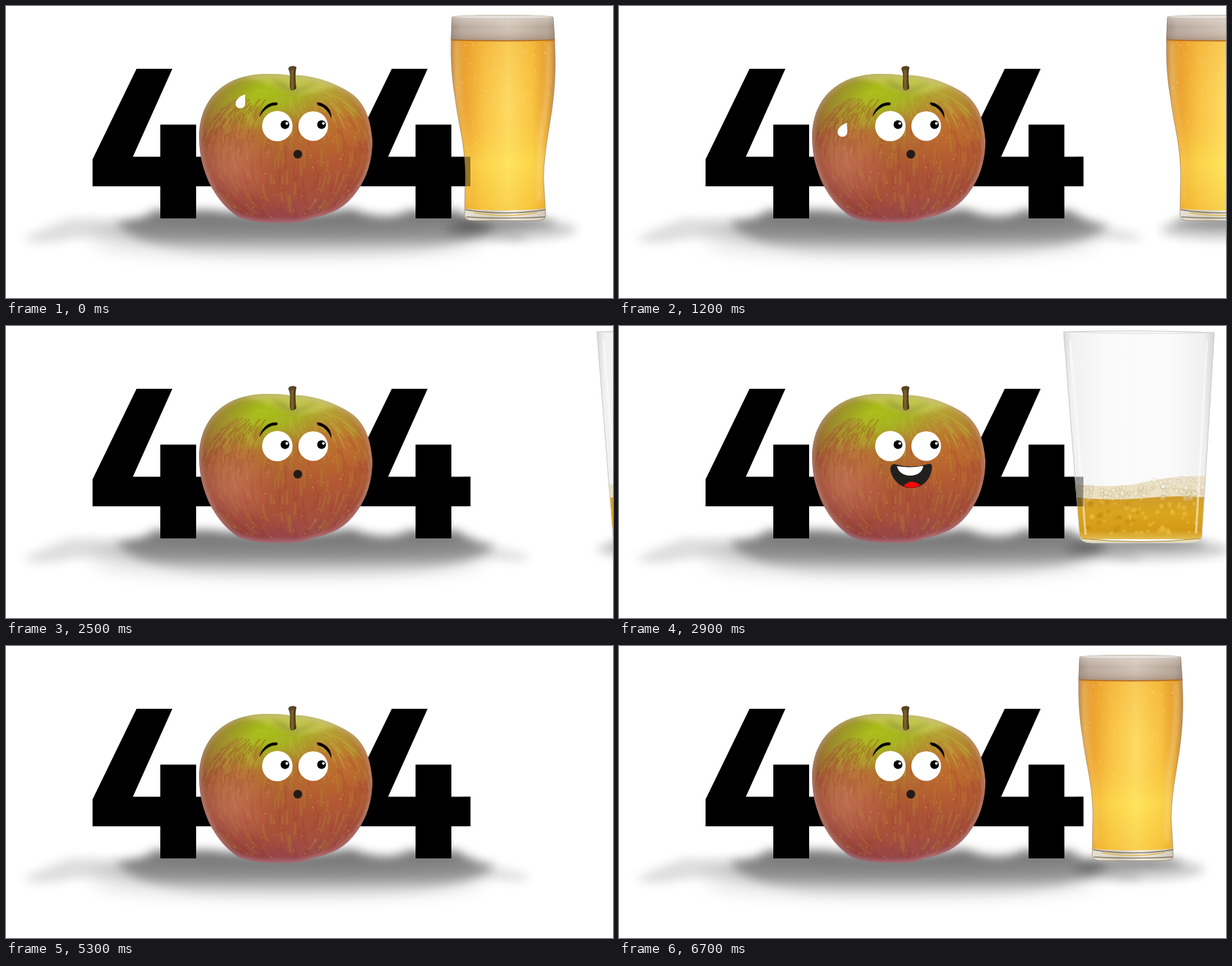
Write an HTML page that moves like this. It is 830 by 400 pixels and loops after 6800 ms.

```html
<!DOCTYPE html>
<html lang="en">
<head>
<meta charset="utf-8">
<title>404</title>
<style>
  html, body { margin: 0; width: 100%; height: 100%; overflow: hidden; background: #fff; }
  svg { display: block; width: 830px; height: 400px; }
  .anim { animation: 6800ms step-end infinite; }
  #beer { animation-name: beer; }
  #cider { animation-name: cider; }
  #drop { animation-name: drop; }
  #happy { animation-name: happy; }
  #worried { animation-name: worried; }
  @keyframes beer {
    0% { transform: translateX(0); }
    14.70% { transform: translateX(20px); }
    16.17% { transform: translateX(80px); }
    17.64% { transform: translateX(140px); }
    19.11% { transform: translateX(200px); }
    20.58% { transform: translateX(290px); }
    94.11% { transform: translateX(200px); }
    95.58% { transform: translateX(140px); }
    97.05% { transform: translateX(80px); }
    98.52%, 100% { transform: translateX(20px); }
  }
  @keyframes cider {
    0% { transform: translateX(290px); }
    36.76% { transform: translateX(200px); }
    38.23% { transform: translateX(140px); }
    39.70% { transform: translateX(80px); }
    41.17% { transform: translateX(20px); }
    42.64% { transform: translateX(0); }
    72.05% { transform: translateX(20px); }
    73.52% { transform: translateX(80px); }
    74.99% { transform: translateX(140px); }
    76.47% { transform: translateX(200px); }
    77.94%, 100% { transform: translateX(290px); }
  }
  @keyframes drop {
    0% { transform: translate(0, 0); opacity: 1; }
    14.70% { transform: translate(-5px, 12px); }
    16.17% { transform: translate(-10px, 25px); }
    17.64% { transform: translate(-15px, 39px); }
    19.11% { transform: translate(-19px, 54px); }
    20.58% { transform: translate(-22px, 70px); opacity: 1; }
    22.05%, 100% { opacity: 0; }
  }
  @keyframes happy {
    0% { opacity: 0; }
    39.70% { opacity: 1; }
    74.99%, 100% { opacity: 0; }
  }
  @keyframes worried {
    0% { opacity: 1; }
    39.70% { opacity: 0; }
    74.99%, 100% { opacity: 1; }
  }
</style>
</head>
<body>
<svg viewBox="0 0 830 400" xmlns="http://www.w3.org/2000/svg">
  <defs>
    <filter id="soft" x="-30%" y="-80%" width="160%" height="260%"><feGaussianBlur stdDeviation="7"/></filter>
    <filter id="wide" x="-30%" y="-120%" width="160%" height="340%"><feGaussianBlur stdDeviation="14"/></filter>
    <filter id="blur" x="-40%" y="-40%" width="180%" height="180%"><feGaussianBlur stdDeviation="3"/></filter>

    <linearGradient id="ground" gradientUnits="userSpaceOnUse" x1="0" y1="286" x2="0" y2="345">
      <stop offset="0" stop-opacity=".55"/><stop offset=".35" stop-opacity=".3"/><stop offset="1" stop-opacity="0"/>
    </linearGradient>

    <linearGradient id="skin" x1=".42" y1="0" x2=".55" y2="1">
      <stop offset="0" stop-color="#c0c545"/><stop offset=".2" stop-color="#b0a232"/>
      <stop offset=".38" stop-color="#b4732f"/><stop offset=".6" stop-color="#ae5833"/>
      <stop offset=".82" stop-color="#a64f3b"/><stop offset="1" stop-color="#9c4d55"/>
    </linearGradient>
    <radialGradient id="green" gradientUnits="userSpaceOnUse" cx="0" cy="0" r="1" gradientTransform="translate(352 118) rotate(-8) scale(92 52)">
      <stop offset="0" stop-color="#a5c010"/><stop offset=".45" stop-color="#a5b41e" stop-opacity=".85"/>
      <stop offset="1" stop-color="#a59a24" stop-opacity="0"/>
    </radialGradient>
    <radialGradient id="shade" gradientUnits="userSpaceOnUse" cx="398" cy="182" r="140">
      <stop offset=".6" stop-color="#6b2030" stop-opacity="0"/>
      <stop offset=".86" stop-color="#6b2030" stop-opacity=".25"/>
      <stop offset="1" stop-color="#552030" stop-opacity=".5"/>
    </radialGradient>
    <radialGradient id="glow" gradientUnits="userSpaceOnUse" cx="455" cy="165" r="75">
      <stop offset="0" stop-color="#c86a2c" stop-opacity=".5"/><stop offset="1" stop-color="#c86a2c" stop-opacity="0"/>
    </radialGradient>
    <radialGradient id="blush" gradientUnits="userSpaceOnUse" cx="308" cy="218" r="62">
      <stop offset="0" stop-color="#cf8070" stop-opacity=".5"/><stop offset="1" stop-color="#cf8070" stop-opacity="0"/>
    </radialGradient>
    <linearGradient id="stalk"><stop offset="0" stop-color="#3f2f14"/><stop offset=".5" stop-color="#80662f"/><stop offset="1" stop-color="#2e2110"/></linearGradient>
    <clipPath id="appleClip"><path id="appleShape" d="M264 180C264 140 283 112 318 99C340 92 365 92 387 95C415 93 450 104 474 121C494 137 499 160 501 185C501 215 492 243 470 266C455 281 437 287 420 290C408 296 398 297 380 297C355 297 335 296 318 289C285 268 264 225 264 180Z"/></clipPath>

    <clipPath id="pintClip"><path id="pint" d="M610 15Q679 10 748 15C751 50 753 90 748 130C744 165 736 195 735 235L738 288Q737 294 726 294H640Q628 294 627 288L628 230C627 185 619 165 614 125C607 85 608 50 610 15Z"/></clipPath>
    <linearGradient id="ale">
      <stop offset="0" stop-color="#b98a50"/><stop offset=".05" stop-color="#dfa850"/>
      <stop offset=".14" stop-color="#eda431"/><stop offset=".32" stop-color="#fac648"/>
      <stop offset=".55" stop-color="#ffde68"/><stop offset=".78" stop-color="#fac644"/>
      <stop offset=".93" stop-color="#e39d30"/><stop offset="1" stop-color="#b98a50"/>
    </linearGradient>
    <linearGradient id="aleTone" x2="0" y2="1">
      <stop offset="0" stop-color="#dd8420" stop-opacity=".32"/><stop offset=".45" stop-color="#f4b030" stop-opacity=".08"/>
      <stop offset=".72" stop-color="#ffec50" stop-opacity=".4"/><stop offset="1" stop-color="#f0b428" stop-opacity=".4"/>
    </linearGradient>
    <linearGradient id="foam">
      <stop offset="0" stop-color="#8f7f73"/><stop offset=".12" stop-color="#b3a194"/>
      <stop offset=".55" stop-color="#cdbeb0"/><stop offset=".9" stop-color="#ae9c8e"/><stop offset="1" stop-color="#887a70"/>
    </linearGradient>
    <linearGradient id="foamTone" x2="0" y2="1">
      <stop offset="0" stop-color="#fff" stop-opacity=".5"/><stop offset=".5" stop-color="#fff" stop-opacity=".08"/>
      <stop offset="1" stop-color="#8a6e58" stop-opacity=".4"/>
    </linearGradient>
    <linearGradient id="base">
      <stop offset="0" stop-color="#8d8377"/><stop offset=".12" stop-color="#e9e4d8"/><stop offset=".4" stop-color="#d6cebe"/>
      <stop offset=".6" stop-color="#f4f0e8"/><stop offset=".88" stop-color="#d0c8b8"/><stop offset="1" stop-color="#80776c"/>
    </linearGradient>

    <clipPath id="tumblerClip"><path id="tumbler" d="M608 8Q711 5 814 9L797 288Q796 297 780 297H648Q631 297 630 288Z"/></clipPath>
    <linearGradient id="glass">
      <stop offset="0" stop-color="#d9d9db"/><stop offset=".05" stop-color="#f1f1f2"/><stop offset=".3" stop-color="#fafafa"/>
      <stop offset=".7" stop-color="#fbfbfb"/><stop offset=".93" stop-color="#f0f0f0"/><stop offset="1" stop-color="#d5d5d5"/>
    </linearGradient>
    <linearGradient id="juice" x2="0" y2="1">
      <stop offset="0" stop-color="#cf9c2c"/><stop offset=".4" stop-color="#dba51e"/>
      <stop offset=".8" stop-color="#d39a16"/><stop offset="1" stop-color="#e3bd52"/>
    </linearGradient>
  </defs>

  <rect width="830" height="400" fill="#fff"/>

  <g id="shadow">
    <ellipse cx="385" cy="318" rx="270" ry="22" opacity=".16" filter="url(#wide)"/>
    <path d="M90 291Q140 291 190 295H600Q650 297 690 308Q735 318 700 322Q650 316 600 322H190Q130 312 85 320Q45 329 22 319Q60 300 90 291Z" opacity=".13" filter="url(#soft)"/>
    <path d="M150 296Q192 292 203 280H278Q380 292 472 278Q520 298 552 280H615Q640 296 670 300Q620 345 380 348Q200 345 150 296Z" fill="url(#ground)" filter="url(#soft)"/>
  </g>

  <path id="four" d="M178.500 86H227.500L173.500 206.500H211V162.500H260V206.500H286.200V247H260V291H211V247H118.400V210Z"/>
  <use href="#four" x="349"/>

  <g id="apple">
    <g clip-path="url(#appleClip)">
      <use href="#appleShape" fill="url(#skin)"/>
      <rect x="260" y="80" width="250" height="220" fill="url(#glow)"/>
      <rect x="260" y="80" width="250" height="220" fill="url(#green)"/>
      <g id="streaks" fill="none" stroke-linecap="round"></g>
      <rect x="260" y="80" width="250" height="220" fill="url(#shade)"/>
      <rect x="240" y="150" width="140" height="140" fill="url(#blush)"/>
      <path d="M322 99C350 88 430 90 458 108C436 112 420 123 392 119C370 113 352 101 322 99Z" fill="#c8cb58" opacity=".8" filter="url(#blur)"/>
      <path d="M362 101Q380 104 391 114Q407 113 425 104Q405 121 389 118Q375 113 362 101Z" fill="#7d7d20" opacity=".55" filter="url(#blur)"/>
      <use href="#appleShape" fill="none" stroke="#d3b3bb" stroke-width="5" opacity=".6" filter="url(#blur)"/>
    </g>
    <path d="M389 115C386 105 391 96 386 86C388 82 395 81 397 84C395 95 396 104 397 113Q393 117 389 115Z" fill="url(#stalk)"/>
    <ellipse cx="391.500" cy="85" rx="5" ry="2.500" fill="#594620"/>

    <path id="drop" class="anim" d="M327 121C318 124 314 129 314 134C314 142 326 142 327 135C328 130 326 126 327 121Z" fill="#fff"/>

    <circle cx="371" cy="164.500" r="20.800" fill="#fff"/>
    <circle cx="420" cy="164.500" r="20.300" fill="#fff"/>
    <g id="pupil"><circle cx="381.500" cy="162.500" r="6"/><circle cx="384" cy="160.800" r="1.900" fill="#fff"/></g>
    <use href="#pupil" x="50"/>

    <g id="worried" class="anim">
      <path d="M346.500 152C349 140 359 131 370 132Q373 134 370 136C360 136 353 142 346.500 152Z"/>
      <path d="M426 132C437 133 446 142 445 154C441 144 435 138 427 136Q424 133 426 132Z"/>
      <circle cx="399" cy="203" r="6" fill="#211c1a"/>
    </g>
    <g id="happy" class="anim">
      <path d="M376 189Q400 196 423 189Q428 188 428 193C427 211 414 222 400 222C385 222 373 211 371 196Q371 190 376 189Z" fill="#221f1f"/>
      <path d="M380 192Q399 195 416 191.500C415 200 408 205 398 205C389 205 382 200 380 192Z" fill="#fff"/>
      <path d="M389 219Q400 208 412 218Q400 225 389 219Z" fill="#f5090c"/>
    </g>
  </g>

  <g id="beer" class="anim">
    <ellipse cx="690" cy="306" rx="90" ry="15" opacity=".2" filter="url(#soft)"/>
    <ellipse cx="684" cy="297" rx="68" ry="7" opacity=".35" filter="url(#soft)"/>
    <g clip-path="url(#pintClip)">
      <use href="#pint" fill="url(#ale)"/>
      <use href="#pint" fill="url(#aleTone)"/>
      <path d="M616 50C614 90 620 130 628 175L632 270" fill="none" stroke="#ffe0a0" stroke-width="3" opacity=".4" filter="url(#blur)"/>
      <path d="M742 50C744 100 738 145 731 180L729 268" fill="none" stroke="#ffeab0" stroke-width="4" opacity=".6" filter="url(#blur)"/>
      <g id="fizz"></g>
      <path id="head" d="M605 10H755V46Q680 49 605 46Z" fill="url(#foam)"/>
      <path d="M605 10H755V46Q680 49 605 46Z" fill="url(#foamTone)"/>
      <path d="M608 46.500Q680 49 752 46.500" fill="none" stroke="#b5691c" stroke-width="1.500"/>
      <path d="M605 276Q683 284 755 276V300H605Z" fill="url(#base)"/>
      <path d="M628 279Q683 288 738 279M629 289Q684 292 737 289" fill="none" stroke="#5f5540" stroke-width="1.500" opacity=".7"/>
      <path d="M640 283Q684 291 726 283" fill="none" stroke="#dcb95a" stroke-width="1.500"/>
    </g>
    <use href="#pint" fill="none" stroke="#806348" stroke-width="1" opacity=".5"/>
    <ellipse cx="679" cy="15" rx="68" ry="2.500" fill="#e6dfd8" stroke="#c5bcb3" stroke-width=".8"/>
  </g>

  <g id="cider" class="anim">
    <ellipse cx="722" cy="306" rx="114" ry="15" opacity=".2" filter="url(#soft)"/>
    <ellipse cx="714" cy="298" rx="90" ry="7" opacity=".33" filter="url(#soft)"/>
    <g clip-path="url(#tumblerClip)">
      <use href="#tumbler" fill="url(#glass)"/>
      <path d="M620 216Q665 222 705 217Q755 203 810 206V240H620Z" fill="#e6d9b2" opacity=".75"/>
      <path d="M620 234Q665 240 715 236Q760 231 810 235V292H620Z" fill="url(#juice)"/>
      <g id="bubbles"></g>
      <path d="M628 290Q714 300 800 290V300H628Z" fill="#eadfb9"/>
      <path d="M632 291Q714 300 796 291" fill="none" stroke="#a98d3c"/>
      <path d="M617 20L638 286M804 20L789 284" fill="none" stroke="#fff" stroke-width="3" opacity=".5"/>
    </g>
    <use href="#tumbler" fill="none" stroke="#c9c9c9"/>
    <path d="M609 8Q711 12 813 9" fill="none" stroke="#ddd"/>
  </g>

  <!-- the end of the bar shows through the glasses -->
  <path d="M624 206.500H635V247H626Z" opacity=".4"/>
</svg>

<script>
  let seed = 41;
  const rnd = () => (seed = seed * 16807 % 2147483647) / 2147483647;
  const range = (a, b) => a + (b - a) * rnd();

  function add(parent, tag, attrs) {
    const el = document.createElementNS('http://www.w3.org/2000/svg', tag);
    for (const key in attrs) el.setAttribute(key, attrs[key]);
    document.getElementById(parent).appendChild(el);
  }

  // point on an apple meridian; s: side -1..1, t: stem 0 to base PI
  const meridian = (s, t) =>
    (386 + s * 119 * Math.sin(t)).toFixed(1) + ' ' + (203 - 94 * Math.cos(t)).toFixed(1);

  function streaks(count, from, to, len, stroke, width, opacity, left = -1, right = 1) {
    let d = '';
    for (let i = 0; i < count; i++) {
      const s = Math.sin(range(Math.asin(left), Math.asin(right)));
      const t = range(from, to), l = len * range(.3, 1);
      d += 'M' + meridian(s, t) + 'L' + meridian(s, t + l / 2) + 'L' + meridian(s, t + l);
    }
    add('streaks', 'path', { d, stroke, 'stroke-width': width, opacity });
  }

  streaks(170, .9, 2.7, .25, '#a03a30', 3, .26);
  streaks(130, .8, 2.4, .25, '#b0922c', 3, .26);
  streaks(110, .6, 1.4, .25, '#a5402a', 2.2, .36, -1, -.4);
  streaks(110, .3, 1.1, .25, '#b8b83a', 1.8, .4);
  streaks(140, .9, 2.6, .15, '#c0642f', 2, .35);
  streaks(120, .8, 2.8, .012, '#dfb568', 1.3, .55);

  function dots(parent, count, box, size, attrs) {
    for (let i = 0; i < count; i++)
      add(parent, 'circle', {
        cx: range(box[0], box[2]).toFixed(1), cy: range(box[1], box[3]).toFixed(1),
        r: range(size / 2, size).toFixed(1), ...attrs
      });
  }

  dots('fizz', 60, [615, 50, 745, 130], 1, { fill: '#ffeeb4', opacity: .5 });
  dots('fizz', 30, [630, 130, 735, 265], .9, { fill: '#fff0a8', opacity: .5 });
  dots('bubbles', 70, [634, 220, 798, 237], 4, { fill: '#fff', 'fill-opacity': .25, stroke: '#c3a965', 'stroke-width': .6, opacity: .7 });
  dots('bubbles', 22, [730, 208, 799, 222], 4, { fill: '#fff', 'fill-opacity': .35, stroke: '#c9bda0', 'stroke-width': .6, opacity: .8 });
  dots('bubbles', 45, [635, 240, 793, 286], 3.5, { fill: '#f0c84c', opacity: .4 });
  dots('bubbles', 22, [635, 240, 720, 280], 4, { fill: '#b57d10', opacity: .3 });
</script>
</body>
</html>
```
